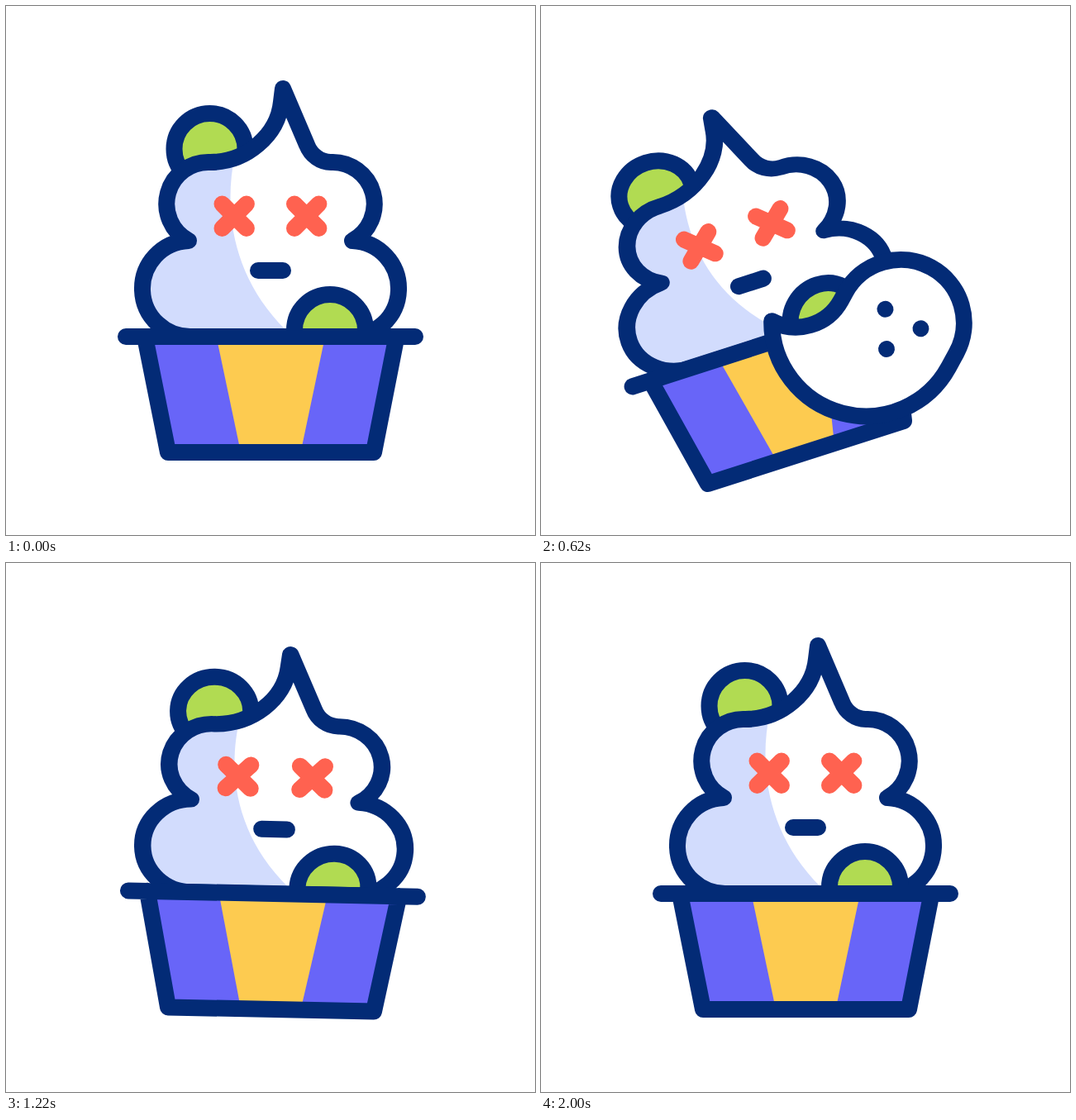
An HTML page that plays this animation: 640x640 px, repeating every 2.4 s.

```html
<!DOCTYPE html>
<html lang="en">
<head>
<meta charset="utf-8">
<title>Frozen yogurt ghost</title>
<style>
  html, body { margin: 0; width: 100%; height: 100%; overflow: hidden; background: #fff; }
  svg { display: block; width: 100%; height: 100%; }
  .line { stroke: #032b76; stroke-width: 20; stroke-linecap: round; stroke-linejoin: round; fill: none; }
  .line, .eyes { vector-effect: non-scaling-stroke; }
  .white { fill: #fff; }
  .green { fill: #b1db52; }
  .eyes { stroke: #ff6250; stroke-width: 20; stroke-linecap: round; fill: none; }
</style>
</head>
<body>
<svg viewBox="0 0 640 640">
  <defs>
    <path id="swirl" d="M225 400A58 58 0 0 1 221 284A50.5 50.5 0 0 1 247 189C291 189 329 156 333 116L335 100L364 168C369 181 381 189 393 189A50.5 50.5 0 0 1 419 284A58 58 0 0 1 415 400Z"/>
    <clipPath id="inside"><use href="#swirl"/></clipPath>
  </defs>
  <g id="dessert">
    <g id="cream">
      <circle class="line green" cx="246.5" cy="173" r="43"/>
      <use href="#swirl" fill="#fff"/>
      <path clip-path="url(#inside)" fill="#d2dcfd" d="M277 180C262 250 275 335 347 400H150V180Z"/>
      <use href="#swirl" class="line"/>
      <path class="eyes" d="M261.5 239.5l29.4 29.4m0-29.4l-29.4 29.4M349 239.5l29.4 29.4m0-29.4l-29.4 29.4"/>
      <path id="mouth" class="line" d="M305 320H335"/>
    </g>
    <path id="berry" class="line green" d="M349 400V392A43 43 0 0 1 435 392V400Z"/>
    <path fill="#6865f8" d="M168 400L196 540H445L472.5 400Z"/>
    <path fill="#fdcb50" d="M254.5 400L284 540H356.5L386 400Z"/>
    <path class="line" d="M168 400L196 540H445L472.5 400M145 400H495"/>
  </g>
  <g id="ghost">
    <path class="line white" d="M-138 37A62 62 0 0 0 -76.5 -25V-36A76.5 76.5 0 0 1 76.5 -36V-17A114 114 0 0 1 -138 37Z"/>
    <path class="line" d="M-24.5 -41.6h.01M24.5 -41.6h.01M0 0h.01"/>
  </g>
</svg>
<script>
const LOOP = 2400;
const [dessert, cream, mouth, berry, ghost] =
  ["dessert", "cream", "mouth", "berry", "ghost"].map(id => document.getElementById(id));

// [time, value]
const SWING = [[0, 0], [660, -18], [1069, 8.1], [1340, -3.7], [1650, 1.9], [2000, 0]];
const SQUASH = [[370, 0], [810, .106], [1095, 0], [1400, .094], [1700, 0]];
const GROWTH = [[80, 0], [460, 1]];
// [time, x, y, angle]
const FLIGHT = [
  [80, 282, 452, 92], [340, 306.5, 449, 65.1], [620, 418, 415, 28.7],
  [860, 467.5, 207, 4.7], [1060, 482, 25, 0], [1260, 483, -160, 0]
];

const smooth = u => u * u * (3 - 2 * u);

function ease(keys, t) {
  if (t <= keys[0][0]) return keys[0][1];
  const i = keys.findIndex(k => k[0] > t);
  if (i < 0) return keys[keys.length - 1][1];
  const [t0, a] = keys[i - 1], [t1, b] = keys[i];
  return a + (b - a) * smooth((t - t0) / (t1 - t0));
}

// Hermite curve through the keys with averaged slopes
function glide(keys, t, n) {
  const last = keys.length - 1;
  const i = Math.max(1, keys.findIndex(k => k[0] > t));
  const slope = j => {
    const a = keys[Math.max(0, j - 1)], b = keys[Math.min(last, j + 1)];
    return (b[n] - a[n]) / (b[0] - a[0]);
  };
  const p = keys[i - 1], q = keys[i], d = q[0] - p[0], u = (t - p[0]) / d;
  return p[n] + (q[n] - p[n]) * smooth(u)
    + d * u * (1 - u) * (slope(i - 1) * (1 - u) - slope(i) * u);
}

function draw(t) {
  dessert.setAttribute("transform", `rotate(${ease(SWING, t)} 320.5 540)`);

  const q = ease(SQUASH, t);
  cream.setAttribute("transform",
    `translate(320 400) scale(${1 + .72 * q} ${1 - q}) translate(-320 -400)`);
  mouth.setAttribute("transform", `translate(0 ${-20 * q})`);
  const lean = 1.05 * q, height = 1 - .65 * q;
  berry.setAttribute("transform",
    `matrix(1 0 ${-lean} ${height} ${400 * lean} ${400 * (1 - height)})`);

  const shown = t > 80 && t < 1260;
  ghost.style.display = shown ? "" : "none";
  if (shown) {
    const [x, y, angle] = [1, 2, 3].map(n => glide(FLIGHT, t, n));
    ghost.setAttribute("transform",
      `translate(${x} ${y}) rotate(${angle}) scale(${ease(GROWTH, t)})`);
  }
}

let start;
function tick(now) {
  start ??= now;
  draw((now - start) % LOOP);
  requestAnimationFrame(tick);
}
draw(0);
requestAnimationFrame(tick);
</script>
</body>
</html>
```
